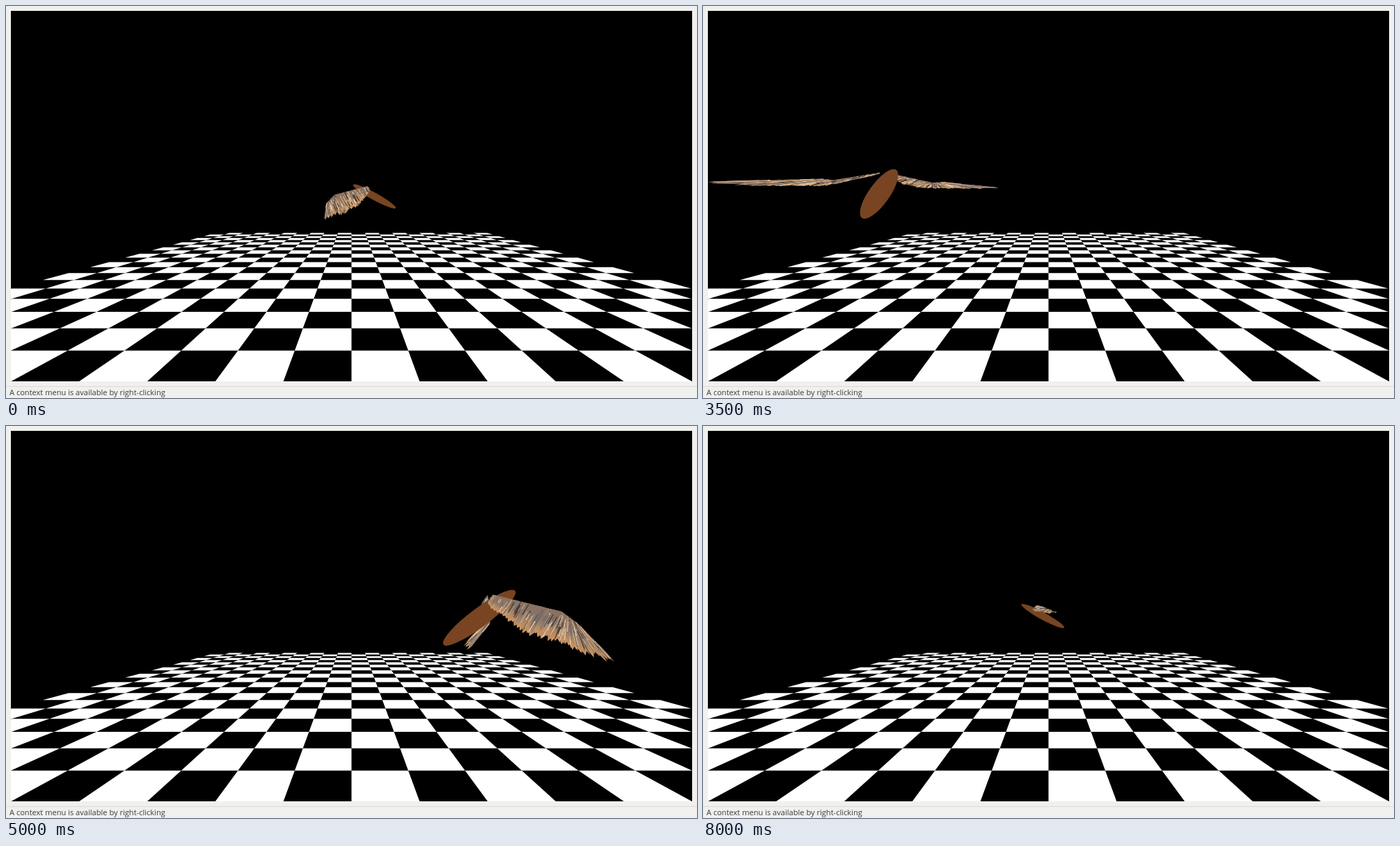
An HTML page with a canvas for the animation above (8500 ms loop, 993 by 564 pixels).

```html
<!DOCTYPE html>
<html lang="en">
<head>
<meta charset="utf-8">
<title>Flapping bird</title>
<style>
  html, body { margin: 0; width: 100%; height: 100%; overflow: hidden; background: #f0f0ef; }
  canvas { position: absolute; left: 7px; top: 7px; background: #000; }
  #status {
    position: absolute; left: 0; right: 0; top: 547px; height: 17px;
    box-sizing: border-box; border-top: 1px solid #dcdbda; padding-left: 5px;
    font: 11.08px/16px "Open Sans", sans-serif; color: #3c3c3c; white-space: nowrap;
  }
</style>
</head>
<body>
<canvas id="view" width="979" height="533"></canvas>
<div id="status">A context menu is available by right-clicking</div>
<script>
const ctx = document.getElementById('view').getContext('2d');
ctx.translate(-7, -7);

const LOOP = 8500, STEP = 500;
const CENTER = 496.5, HORIZON = 273.5;
const FOCAL = 546, RADIUS = 235;
const FLAP = 2.25; // seconds per wing beat

// Orbit angle at a few moments: [seconds, radians]
const TURN = [[0, 0.2], [1.5, -0.745], [2.5, -1.56], [3.5, -2.32],
              [4.5, -3.212], [6, -4.53], [8, -6.333]];

// Wing joints as [side, forward, up] from the body centre
const SHOULDER = [3, 14, 21];
const WRIST = { raised: [47, 22, 12], lowered: [35, 76, 3] };
const HAND = { raised: [56, 20, 13], lowered: [46, 90, -14] };

const FEATHERS = 38;
const STREAKS = ['#f0dcc2', '#dfb487', '#c48e5c', '#5f595a', '#857c79', '#3a2b22', '#c9a67f'];

const mix = (a, b, k) => a + (b - a) * k;
const mixAll = (a, b, k) => a.map((v, i) => mix(v, b[i], k));

function seeded(seed) {
  return () => {
    seed = (seed * 1664525 + 1013904223) >>> 0;
    return seed / 4294967296;
  };
}

function fillPoly(points, style) {
  ctx.beginPath();
  points.forEach(([x, y]) => ctx.lineTo(x, y));
  ctx.closePath();
  ctx.fillStyle = style;
  ctx.fill();
}

function drawFloor() {
  const point = (col, row) => {
    const depth = 1 + row * 0.2015;
    return [CENTER + 98 * col / depth, HORIZON + 267 / depth];
  };
  for (let row = 0; row < 20; row++) {
    for (let col = -10; col < 10; col++) {
      if ((row + col) % 2) continue;
      fillPoly([point(col, row), point(col + 1, row),
                point(col + 1, row + 1), point(col, row + 1)], '#fff');
    }
  }
}

function angleAt(sec) {
  let i = 0;
  while (i < TURN.length - 2 && sec >= TURN[i + 1][0]) i++;
  const [t0, a0] = TURN[i], [t1, a1] = TURN[i + 1];
  return mix(a0, a1, (sec - t0) / (t1 - t0));
}

// Place and heading of the bird on its circle
function birdAt(sec) {
  const angle = angleAt(sec), sin = Math.sin(angle), cos = Math.cos(angle);
  return {
    x: RADIUS * sin, y: 3 * sin, z: FOCAL + RADIUS * cos,
    ahead: [-cos, sin], right: [sin, cos],
    down: 0.5 + 0.5 * Math.cos(2 * Math.PI * (sec - 0.1) / FLAP)
  };
}

function project(bird, [side, fwd, up]) {
  const { x, y, z, ahead, right } = bird;
  const s = FOCAL / (z + ahead[1] * fwd + right[1] * side);
  return [CENTER + s * (x + ahead[0] * fwd + right[0] * side), HORIZON + s * (y - up)];
}

// Outline of an ellipsoid, from its three projected half axes
function drawBody(bird) {
  const c = project(bird, [0, 0, 0]);
  let xx = 0, xy = 0, yy = 0;
  for (const axis of [[0, 44, 24], [11, 0, 0], [0, -3.5, 6.5]]) {
    const p = project(bird, axis), q = project(bird, axis.map(v => -v));
    const dx = (p[0] - q[0]) / 2, dy = (p[1] - q[1]) / 2;
    xx += dx * dx; xy += dx * dy; yy += dy * dy;
  }
  const mean = (xx + yy) / 2, spread = Math.hypot((xx - yy) / 2, xy);
  ctx.beginPath();
  ctx.ellipse(c[0], c[1], Math.sqrt(mean + spread), Math.sqrt(mean - spread),
              Math.atan2(2 * xy, xx - yy) / 2, 0, Math.PI * 2);
  ctx.fillStyle = '#784421';
  ctx.fill();
}

// sign is 1 for the right wing, -1 for the left
function drawWing(bird, sign) {
  const rand = seeded(30 + sign * 17), { down } = bird;
  const wrist = mixAll(WRIST.raised, WRIST.lowered, down);
  const hand = mixAll(HAND.raised, HAND.lowered, down);

  // Feathers point back at the shoulder and fan outward along the hand
  const along = (u, k) => {
    const outer = Math.max(0, (u - 0.5) * 2);
    const bone = outer ? mixAll(wrist, hand, outer) : mixAll(SHOULDER, wrist, u * 2);
    const fan = outer * Math.PI / 2;
    const length = k * (mix(14, 38, Math.min(1, u * 3)) + outer * mix(48, 0, down));
    const flat = mix(1, 0.45, down);
    const side = bone[0] + Math.sin(fan) * flat * length;
    const fwd = bone[1] - Math.cos(fan) * flat * length;
    const up = bone[2] + mix(0.06 * outer - 0.12, -0.85, down) * length;
    return project(bird, [side * sign, fwd, up]);
  };

  for (let i = 0; i < FEATHERS; i++) {
    const u = i / FEATHERS, v = Math.min(1, u + 1.5 / FEATHERS), mid = (u + v) / 2;
    const reach = 0.87 + rand() * 0.15;
    const root = along(mid, 0), tip = along(mid, reach);
    const shade = ctx.createLinearGradient(...root, ...tip);
    shade.addColorStop(0, '#8a7260');
    shade.addColorStop(0.45, '#84736a');
    shade.addColorStop(0.75, '#b88a60');
    shade.addColorStop(1, '#cc9a68');
    fillPoly([root, along(v, 0), along(v, reach * 0.86), tip, along(u, reach * 0.86), along(u, 0)], shade);

    ctx.lineWidth = 1.1;
    for (let n = 0; n < 5; n++) {
      const w = mix(u, v, rand()), from = rand() * 0.6;
      ctx.strokeStyle = STREAKS[Math.floor(rand() * STREAKS.length)];
      ctx.beginPath();
      ctx.moveTo(...along(w, from));
      ctx.lineTo(...along(w, Math.min(reach * 0.95, from + 0.2 + rand() * 0.35)));
      ctx.stroke();
    }
  }
}

function draw(t) {
  const bird = birdAt(t / 1000);
  const near = bird.right[1] < 0 ? 1 : -1;
  ctx.clearRect(0, 0, 993, 564);
  drawFloor();
  drawWing(bird, -near);
  drawBody(bird);
  drawWing(bird, near);
}

let shown = -1;
function tick() {
  const t = Math.floor(performance.now() % LOOP / STEP) * STEP;
  if (t !== shown) draw(shown = t);
  requestAnimationFrame(tick);
}
tick();
</script>
</body>
</html>
```
